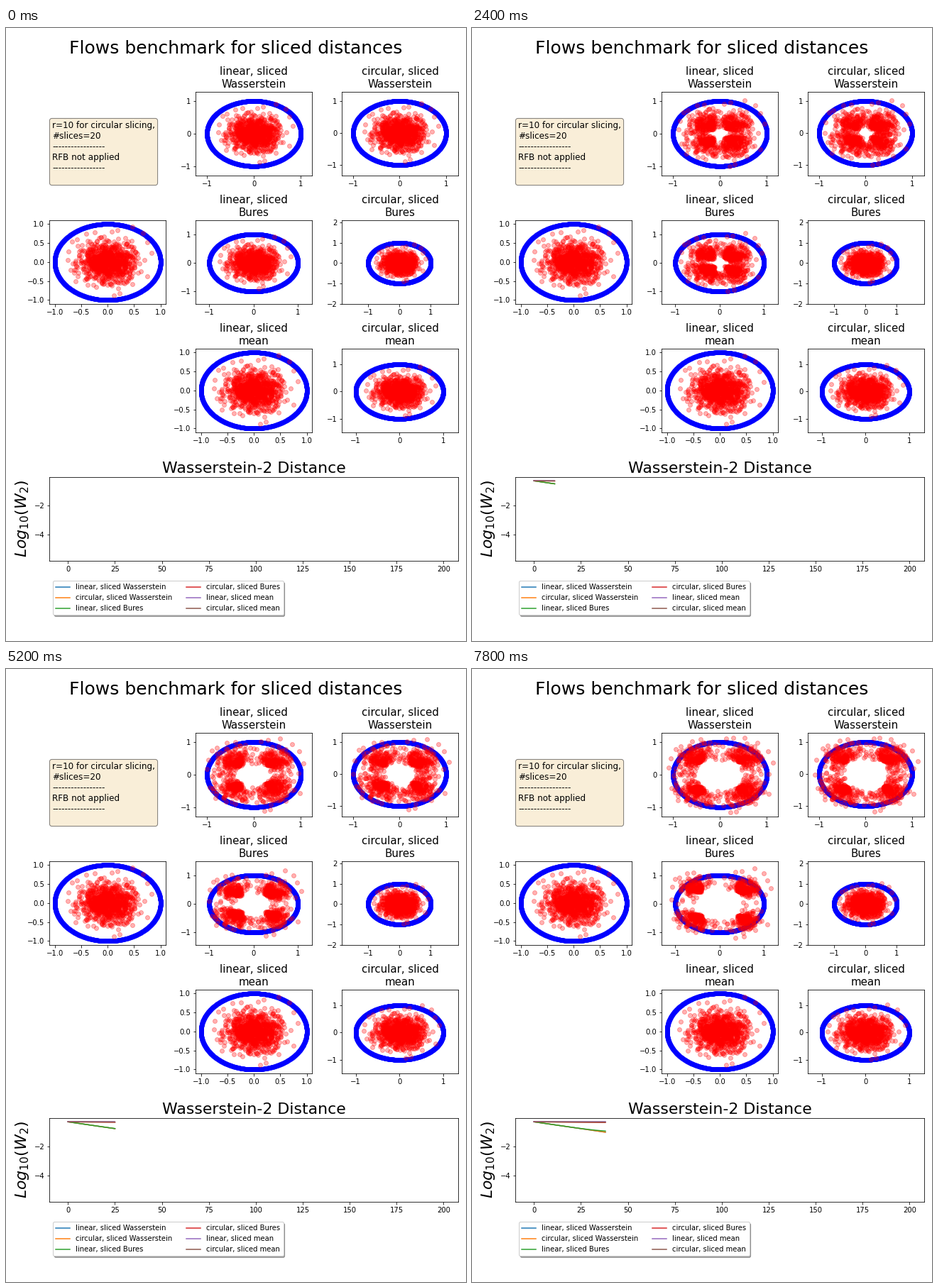
Recreate the animation shown at these times as a matplotlib script. Size 648 by 864 pixels, loop 8 s.

```python
import numpy as np
import matplotlib.pyplot as plt
from matplotlib.animation import FuncAnimation
from matplotlib.patches import FancyBboxPatch

W, H, DPI = 648, 864, 72
FRAMES, INTERVAL = 40, 200
COUNT, SLICES, RADIUS = 1000, 20, 10
LEFT, TOP, COL, ROW, PW, PH = 61.2, 89.8, 206, 181, 164, 118

plt.rcParams["font.family"] = "DejaVu Sans"

angle = np.linspace(0, 2 * np.pi, COUNT, endpoint=False)
ring = np.column_stack([np.cos(angle), np.sin(angle)])

STRAYS = np.array([
    (.47, .92), (.67, .76), (-.25, .77), (-.40, .74), (.08, .79), (.19, .83),
    (.75, .51), (.83, .23), (-.67, .53), (-.58, .60), (-.74, .27),
    (-.76, .05), (-.70, -.20), (-.60, -.50), (.22, -.83), (.12, -.88),
    (.75, -.38), (.47, -.59)])


def start_cloud():
    rng = np.random.default_rng(4)
    pts = rng.normal(0, 0.25, (COUNT - len(STRAYS), 2))
    r = np.hypot(*pts.T)[:, None]
    pts = np.where(r > 0.72, pts * 0.6 / r, pts)
    return np.vstack([pts - pts.mean(0), STRAYS])


def project(pts, dirs, circular):
    """Slice coordinates of the points and their gradients."""
    if circular:
        d = pts[:, None, :] - RADIUS * dirs
        p = np.linalg.norm(d, axis=2)
        return p, d / p[..., None]
    return pts @ dirs.T, dirs[None]


def gradient(pts, kind, circular, rng):
    a = rng.uniform(0, 2 * np.pi, SLICES)
    dirs = np.column_stack([np.cos(a), np.sin(a)])
    p, u = project(pts, dirs, circular)
    q, _ = project(ring, dirs, circular)
    if kind == "wasserstein":
        goal = np.empty_like(p)
        np.put_along_axis(goal, np.argsort(p, 0), np.sort(q, 0), 0)
        diff = p - goal
    elif kind == "bures":
        diff = (p - p.mean(0)) * (1 - q.std(0) / p.std(0))
    else:
        diff = np.broadcast_to(p.mean(0) - q.mean(0), p.shape)
    return (diff[..., None] * u).mean(1)


def flow(kind, circular, seed, rate=0.01):
    """Adam descent; returns the cloud after every step."""
    rng = np.random.default_rng(seed)
    x = start_cloud()
    m, v = np.zeros_like(x), np.zeros_like(x)
    path = [x]
    for k in range(1, FRAMES):
        g = gradient(x, kind, circular, rng)
        m = 0.9 * m + 0.1 * g
        v = 0.999 * v + 0.001 * g * g
        step = (m / (1 - 0.9 ** k)) / (np.sqrt(v / (1 - 0.999 ** k)) + 1e-8)
        x = x - rate * step
        path.append(x)
    return path


fig = plt.figure(figsize=(W / DPI, H / DPI), dpi=DPI, facecolor="white")
fig.suptitle("Flows benchmark for sliced distances", fontsize=25, y=0.98)


def pixel_axes(x, y, w, h):
    return fig.add_axes([x / W, 1 - (y + h) / H, w / W, h / H])


def cloud_panel(row, col, title, xlim, ylim, xticks, yticks):
    ax = pixel_axes(LEFT + COL * col, TOP + ROW * row, PW, PH)
    ax.scatter(*ring.T, color="blue", alpha=0.3)
    dots = ax.scatter(*start_cloud().T, color="red", alpha=0.3)
    ax.set_title(title, fontsize=15)
    ax.set(xlim=xlim, ylim=ylim, xticks=xticks, yticks=yticks)
    return dots


# Settings box
page = fig.add_axes([0, 0, 1, 1])
page.set(xlim=(0, W), ylim=(H, 0))
page.axis("off")
page.add_patch(FancyBboxPatch((65, 131), 145, 87, boxstyle="round,pad=3.6",
                              fc="wheat", ec="black", alpha=0.5, lw=1))
dashes = "-" * 17
notes = ["r=10 for circular slicing,", "#slices=20", dashes,
         "RFB not applied", dashes]
for i, line in enumerate(notes):
    page.text(65, 141 + 15 * i, line, fontsize=12, va="baseline")

# Particle panels
half, unit = [-1, -.5, 0, .5, 1], [-1, 0, 1]
tight = (-1.1, 1.1)
cloud_panel(1, 0, "", tight, tight, half, half)
panels = [
    (cloud_panel(0, 1, "linear, sliced\nWasserstein", (-1.24, 1.24),
                 (-1.285, 1.285), unit, unit), flow("wasserstein", False, 1)),
    (cloud_panel(0, 2, "circular, sliced\nWasserstein", (-1.24, 1.265),
                 (-1.325, 1.29), unit, unit), flow("wasserstein", True, 2)),
    (cloud_panel(1, 1, "linear, sliced\nBures", (-1.305, 1.32),
                 (-1.432, 1.49), unit, unit), flow("bures", False, 3)),
    (cloud_panel(1, 2, "circular, sliced\nBures", (-1.833, 1.878),
                 (-2.01, 2.12), unit, [-2, -1, 0, 1, 2]),
     flow("mean", True, 5)),
    (cloud_panel(2, 1, "linear, sliced\nmean", tight, tight, half, half),
     flow("mean", False, 6)),
    (cloud_panel(2, 2, "circular, sliced\nmean", (-1.313, 1.345),
                 (-1.494, 1.58), unit, unit), flow("mean", True, 7)),
]

# Distance chart
chart = pixel_axes(LEFT, TOP + 3 * ROW, 576, PH)
chart.set_title("Wasserstein-2 Distance", fontsize=22)
chart.set_ylabel("$Log_{10}(W_2)$", fontsize=22)
chart.set(xlim=(-9.9, 207.9), ylim=(-5.74, -0.1),
          xticks=range(0, 201, 25), yticks=[-4, -2])

k = np.arange(FRAMES)
fall = -0.36 - 0.0184 * k
curves = [
    ("linear, sliced Wasserstein", fall),
    ("circular, sliced Wasserstein", fall),
    ("linear, sliced Bures", fall + 0.08 * (k / 38) ** 5),
    ("circular, sliced Bures", -0.36 - 0.0012 * k),
    ("linear, sliced mean", -0.36 + 0 * k),
    ("circular, sliced mean", -0.36 - 0.0006 * k),
]
lines = [chart.plot([], [], lw=1.5, label=name)[0] for name, _ in curves]
chart.legend(loc="upper left", bbox_to_anchor=(0, -0.2), ncol=2,
             fontsize=10, fancybox=True, shadow=True)


def draw(n):
    for dots, path in panels:
        dots.set_offsets(path[n])
    for line, (_, values) in zip(lines, curves):
        line.set_data(k[:n], values[:n])
    return lines + [dots for dots, _ in panels]


anim = FuncAnimation(fig, draw, frames=FRAMES, interval=INTERVAL,
                     repeat=True, repeat_delay=0, blit=False)
plt.show()
```
